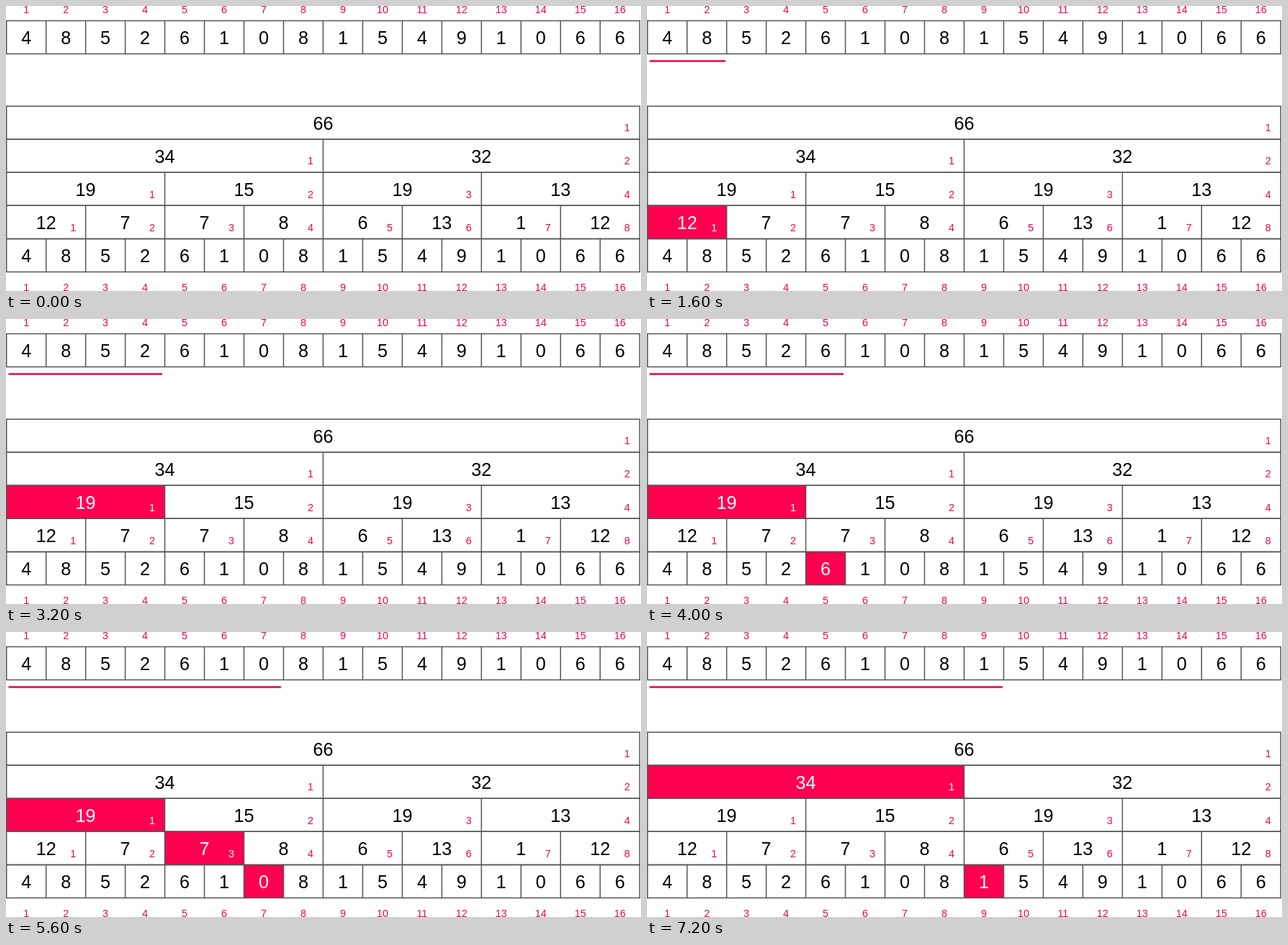
An HTML page for the animation above (8 s loop, 882 px wide and 396 px high).

```html
<!DOCTYPE html>
<html lang="en">
<head>
<meta charset="utf-8">
<title>Prefix sums on a segment tree</title>
<style>
  html, body { margin: 0; width: 100%; height: 100%; overflow: hidden; background: #fff; }
  svg { display: block; }
  text { font: 25.2px "Liberation Sans", Arial, sans-serif; text-anchor: middle; fill: #000; }
  .index { font-size: 14.4px; fill: #f50052; }
  rect { fill: #fff; }
  .on rect { fill: #ff0050; }
  .on text { fill: #fff; }
  .grid { fill: none; stroke: #555; stroke-width: 1.5; }
  #span { stroke: #e8004c; stroke-width: 2.7; }
</style>
</head>
<body>
<svg id="stage" width="882" height="396" viewBox="0 0 882 396"></svg>
<script>
  const STEP = 800, STEPS = 10;
  const LEFT = 0.7, CELL = 54.97, ROW = 46.05, TREE = 139.2, LIST = 20.4;
  const values = [4, 8, 5, 2, 6, 1, 0, 8, 1, 5, 4, 9, 1, 0, 6, 6];
  const ends = [0, 54, 109, 164, 217, 273, 330, 382, 438, 494];
  const stage = document.getElementById("stage");
  const nodes = [];

  function add(parent, tag, attrs, content) {
    const el = document.createElementNS("http://www.w3.org/2000/svg", tag);
    for (const key in attrs) el.setAttribute(key, attrs[key]);
    if (content !== undefined) el.textContent = content;
    return parent.appendChild(el);
  }

  function drawCell(first, size, y, index) {
    const x = LEFT + first * CELL, width = size * CELL;
    const group = add(stage, "g", {});
    const sum = values.slice(first, first + size).reduce((a, b) => a + b);
    add(group, "rect", { x, y, width, height: ROW });
    add(group, "text", { x: x + width / 2, y: y + 32.8 }, sum);
    if (index) add(group, "text", { class: "index", x: x + width - 17.5, y: y + 35.2 }, index);
    return group;
  }

  function drawGrid(size, y) {
    let d = `M${LEFT} ${y}H${LEFT + 16 * CELL}v${ROW}H${LEFT}z`;
    for (let i = size; i < 16; i += size) d += `M${LEFT + i * CELL} ${y}v${ROW}`;
    add(stage, "path", { class: "grid", d });
  }

  // Prefix of n items: one tree node per set bit of n.
  function isUsed(node, n) {
    return (n & node.size) !== 0 && node.first === (n & ~(2 * node.size - 1));
  }

  values.forEach((v, i) => {
    drawCell(i, 1, LIST);
    const x = LEFT + (i + 0.5) * CELL;
    for (const y of [10.2, 396]) add(stage, "text", { class: "index", x, y }, i + 1);
  });
  drawGrid(1, LIST);

  for (let level = 0; level < 5; level++) {
    const size = 16 >> level, y = TREE + level * ROW;
    for (let first = 0; first < 16; first += size) {
      const el = drawCell(first, size, y, size > 1 && first / size + 1);
      nodes.push({ el, first, size });
    }
  }
  for (let level = 0; level < 5; level++) drawGrid(16 >> level, TREE + level * ROW);

  const span = add(stage, "line", { id: "span", x1: 3.5, y1: 76.5, y2: 76.5 });
  let shown = -1;

  function render(now) {
    const n = Math.floor(now / STEP) % STEPS;
    if (n !== shown) {
      shown = n;
      span.setAttribute("x2", ends[n] || 3.5);
      span.style.display = n ? "" : "none";
      for (const node of nodes) node.el.classList.toggle("on", isUsed(node, n));
    }
  }

  const start = performance.now();
  function tick() {
    render(performance.now() - start);
    requestAnimationFrame(tick);
  }
  tick();
</script>
</body>
</html>
```
